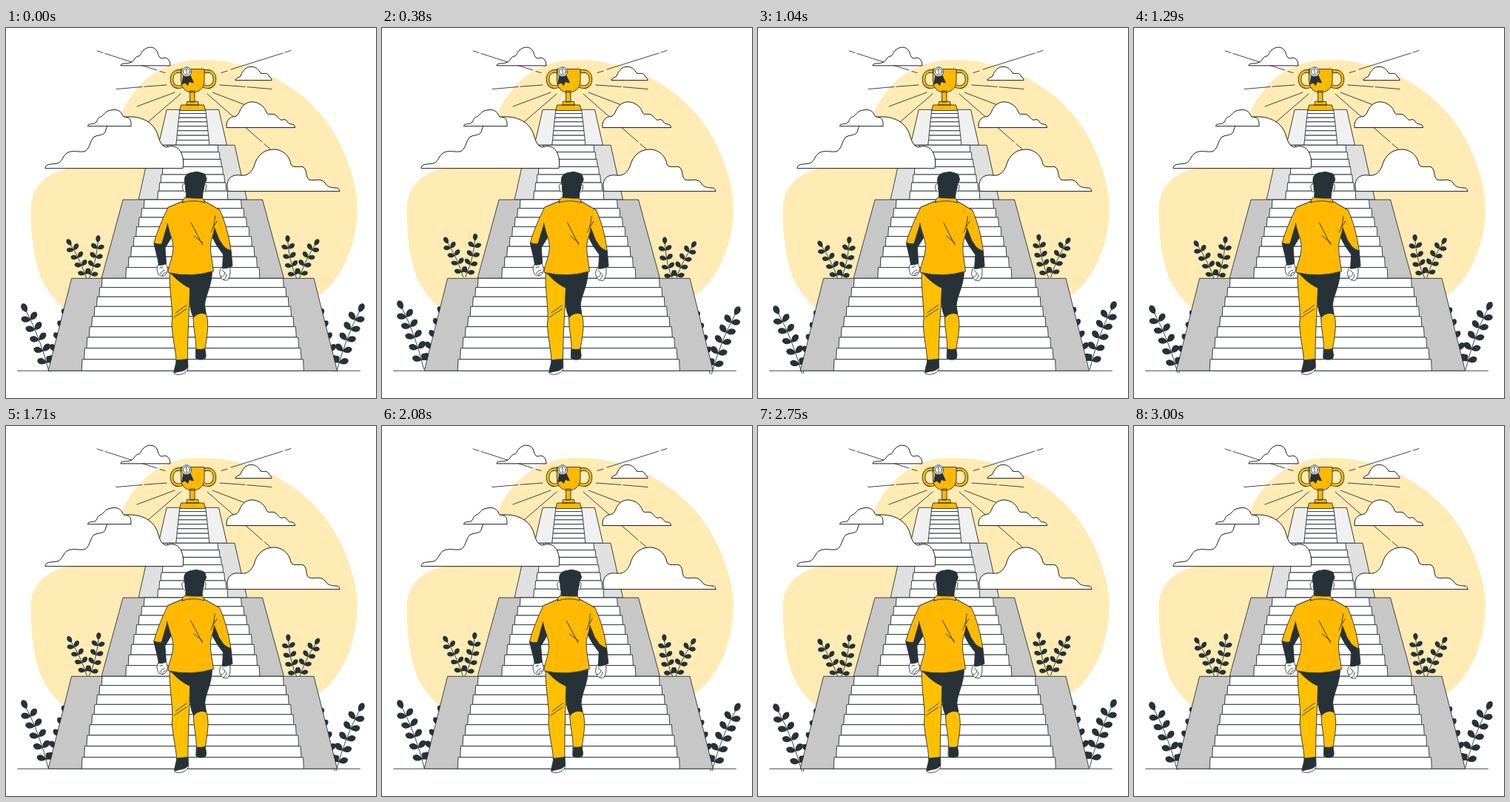
Recreate the animation shown at these times as an HTML page. Size 500x500 px, loop 3.04 s.

```html
<!DOCTYPE html>
<html lang="en">
<head>
<meta charset="utf-8">
<title>Climb to the trophy</title>
<style>
  html, body { margin: 0; width: 100%; height: 100%; overflow: hidden; background: #fff; }
  svg { display: block; width: 100%; height: 100%; }
  .line { fill: none; }
  .y { fill: #ffb900; }
  .leg { fill: #ffc000; }
  .w { fill: #fff; }
  .d { fill: #263238; }
</style>
</head>
<body>
<svg viewBox="0 0 500 500" stroke="#263238" stroke-width=".9" stroke-linejoin="round" stroke-linecap="round">
  <path fill="#ffebb3" stroke="none" d="M262 43C345 43 419 89 452 158C469 195 475 220 475 245C474 292 455 340 421 363L300 420L110 397C86 388 68 372 55 352C40 328 33.500 290 33.500 245C33.500 214 56 192 92 189C131 185 138 157 154 121C174 72 212 43 262 43Z"/>

  <path class="line" d="M123 31l8 2.500M134 34.500L204 57M208 58.500l7 2
    M385 30.500l-8 2.500M374 34L304 56M299 58l-8 2.500
    M149 82.500L184 79.500M187 79.200L217 77M359 82.500L326 79.700M323 79.400L289 77
    M177 106L228 87M189 129.500L236 89M326 105L279 87M272 89L346 154M349 156.500L357 163.500"/>

  <path class="line" d="M15.500 463.200H478.500"/>
  <g id="plants"></g>
  <g id="stairs"></g>

  <g id="trophy">
    <g class="line">
      <path stroke-width="4.600" d="M239 59.500C230 56 224 61 224 69.500C224 79 232 82 240 78M267 59.500C276 56 282 61 282 69.500C282 79 274 82 266 78"/>
      <path stroke="#ffb900" stroke-width="2.900" d="M239 59.500C230 56 224 61 224 69.500C224 79 232 82 240 78M267 59.500C276 56 282 61 282 69.500C282 79 274 82 266 78"/>
    </g>
    <path class="y" d="M249 85H255V100H249ZM245 99.300H259.500L260.500 104H244ZM237 104H267.500L269.500 111.500H235ZM236.500 55.500H268V72C268 81 261 87 252 87C243 87 236.500 81 236.500 72Z"/>
    <path class="d" d="M240 64L237.500 76L242 74L245.500 77.500L247.500 72.500L253.500 74L248.500 63Z"/>
    <circle class="w" cx="244" cy="59.300" r="6.500"/>
    <circle class="w" cx="244" cy="59.300" r="4.500"/>
    <text x="244" y="62" font-family="Lato, sans-serif" font-size="7.500" text-anchor="middle" stroke="none" fill="#263238">1</text>
  </g>

  <g class="w" stroke="#000">
    <path d="M155 50.500C157 46 162 49 167 47C174 46 173 39 179 38C183 37 182 33 185 31C190 24.500 201 24 204.500 32C206 38 208 41.500 211 41C218 38 222 44 222 50.500Z"/>
    <path d="M310 70.300C311 67 315 67 317 65C319 60 322 54 329 52.500C337 51 342 57 344 61C346 63 352 59 355 64C355 67 359 66 359 70.300Z"/>
    <path d="M298 134.200C297 124 303 120 311 119C316 117 315 108 324 102C336 96 349 104 352 114C354 119 360 114 365 118C370 123 370 125 374 124C381 122 379 130 386 130C389 130 390.500 132 390.500 134.200Z"/>
    <path d="M53 189.300C53 183 60 184.500 69 183C77 181 76 172 84 168C92 165 99 168 105 167C113 166 113 152 119 147C127 143.500 134 146 135 137C138 128 143 123 152 121.500C178 116 199 125 205 144C208 155 212 163 219 160.500C234 156 242 172 239 189.300Z"/>
    <path d="M110.500 132.300C111 128 118 131 121 128C124 126 123 121 128 120C132 119 133 112 142 111C151 109 156 113 157.500 118C159 121 160 119.500 164 121C169 122 169 127 169 132.300Z"/>
    <path d="M300 220.300C296 206 303 197 317 199C329 201 335 190 337 181C343 168 352 164 363 164C378 165 384 177 385 184C387 190 397 186 402 188C408 193 404 202 410 205C417 207 424 202 431 209C434 215 440 216 446 216C449 216 451 218 451 220.300Z"/>
  </g>

  <g id="man">
    <!-- legs and shoes -->
    <path class="w" d="M227 464C225 467 229 468.800 235 468.300C242 467 246 463 246 459L243 456Z"/>
    <path class="d" d="M230 449L245.500 447L246 458C242 465 235 463 228 466C226 462 230 456 230 449ZM257 434L269 432.500C269 438 271 442 269.500 446C266 449 259 448.500 256.500 446Z"/>
    <path class="leg" d="M221 332C221 360 226.500 385 224 400C225 420 229 433 230 449Q238 448 245.500 447.500C245.500 430 246 410 247 390L249 345Z"/>
    <path class="d" d="M222 330Q250 337 278.500 329C278 349 269 362 268.500 375L270.500 387L254 392C247 380 248.500 366 249 351.500C239 347 230 340 222 330Z"/>
    <path class="leg" d="M253 392C256 386 267 383 271 388C275 402 271 419 269 433.500Q263 435 257 434C257 420 253 405 253 392Z"/>
    <path class="line" d="M229.500 385L244 374.500M227 391L244 379.500"/>

    <!-- hands -->
    <path class="w" d="M206 319.500C203 324 204 329 206 333C209 336 213 336 216 333C219 329 219 323 215.500 318ZM291.500 323C288 328 288 333 290 336C291 340 296 342 299.500 340.500C303 336 304 328 302 322Z"/>
    <path class="line" d="M209 333C209 330 211 328 214.500 327.500M212 335C211.500 332 213 331 216 330.500M208 324L212 323M290.500 336C292 337 295 335 296 331M294 340C296 339 298 336 298 333M296 331L292 327"/>

    <!-- forearms -->
    <path class="d" d="M217.500 264L223 284L215 297L216.500 318.500Q212 321 206.500 320.500C205 310 202 301 200 291.500Z"/>
    <path class="d" d="M281 270L289 288L304 300L306 321.500Q300 325 292.500 325L293.500 306Q284 294 279 283Z"/>

    <!-- jacket -->
    <path class="y" d="M239 234L219 242.500C212 257 204 275 200 290.500Q205 293 210.500 292L219 263Z"/>
    <path class="y" d="M268 234L289 246C296 262 301 279 304 301Q298 299 294 295L288 286L281 268Z"/>
    <path class="y" stroke="none" d="M239 234L219 242.500L217.500 264L222 274L280 276L289 246L268 234Z"/>
    <path class="y" stroke="none" d="M219 264C221 279 228 290 225.500 302C224 314 219 322 219 330.500Q250 338 280.500 328.500C279 316 276 305 276.500 294C277 284 281 280 281.500 270Z"/>
    <path class="line" d="M239 234L219 242.500M268 234L289 246M218 264C221 279 228 290 225.500 302C224 314 219 322 219 330.500Q250 338 280.500 328.500C279 316 276 305 276.500 294C277 284 281 280 281.500 270"/>
    <path class="line" d="M250 263L265.500 293M254 281L266 290.500M282.500 254C282 262 280 271 277 276M285 261L281 268"/>

    <!-- head and collar -->
    <path class="w" d="M243 211C238 209.500 237.500 214 239 218C240 222 242 222 243.500 221ZM267 211C271 209 271 214 270 218C269 222 267 222 266 221Z"/>
    <path class="d" d="M242.500 213C241 207 240.500 203 243 199.500C247 195 252 195.500 255 194.700C259 193.700 263 195.500 266 196.300C269 197 270.500 199.500 270 201.500C272 203.500 271 207 268.500 209.500C268 214 267.500 219 266 222L265.500 231H243L243.500 222C242 219 242.500 216 242.500 213Z"/>
    <path class="y" d="M238.500 236C239 232 240 229.500 243 229C250 230 259 230 265 230C267 231 268 233 268.500 236C258 233 248 233 238.500 236Z"/>
  </g>
</svg>
<script>
const $ = id => document.getElementById(id);
const LOOP = 3040, AXIS = 252.5;
const mix = (a, b, u) => a + (b - a) * u;

// One flight: half widths of the slabs and of the steps, at top and bottom
function flight(y0, y1, outer, inner, count, fill) {
  const shape = (ya, yb, a, b, color) =>
    `<path fill="${color}" d="M${AXIS - a} ${ya}H${AXIS + a}L${AXIS + b} ${yb}H${AXIS - b}Z"/>`;
  const level = i => mix(y0, y1, i / count * (0.87 + 0.13 * i / count));
  let out = shape(y0, y1, ...outer, fill);
  for (let i = 0; i < count; i++) {
    const half = mix(...inner, i / (count - 1));
    out += shape(level(i), level(i + 1), half - 0.4, half + 0.4, '#fff');
  }
  return out;
}

$('stairs').innerHTML =
  flight(110.3, 158.3, [35, 46], [17.5, 22], 8, '#f0f0f0') +
  flight(158.3, 232, [56.5, 73], [34, 47], 7, '#e0e0e0') +
  flight(232, 338.3, [94, 123], [65.5, 90], 8, '#c7c7c7') +
  flight(338.3, 463.2, [163.5, 195], [122.5, 149.5], 9, '#c7c7c7');

// A sprig follows a quadratic curve, with paired leaves and one at the tip
function sprig([x0, y0, cx, cy, x1, y1], pairs, len) {
  const w = len * 0.42;
  const leaf = (x, y, turn) =>
    `<path class="d" stroke="none" transform="translate(${x} ${y}) rotate(${turn})"
      d="M0 0C${len * 0.3} ${-w} ${len * 0.9} ${-w} ${len} 0C${len * 0.9} ${w} ${len * 0.3} ${w} 0 0Z"/>`;
  const bend = (a, c, b, t) => mix(mix(a, c, t), mix(c, b, t), t);
  const heading = t =>
    Math.atan2(mix(cy - y0, y1 - cy, t), mix(cx - x0, x1 - cx, t)) * 180 / Math.PI;
  let out = `<path class="line" d="M${x0} ${y0}Q${cx} ${cy} ${x1} ${y1}"/>`;
  for (let i = 0; i < pairs; i++) {
    const t = mix(0.13, 0.85, i / (pairs - 1));
    const x = bend(x0, cx, x1, t), y = bend(y0, cy, y1, t);
    out += leaf(x, y, heading(t) - 58) + leaf(x, y, heading(t) + 62);
  }
  return out + leaf(x1, y1, heading(1));
}

const side =
  sprig([58, 464, 46, 418, 28, 384], 5, 13) +
  sprig([60, 464, 72, 420, 88, 376], 5, 12) +
  sprig([109, 339, 101, 314, 88, 294], 4, 10) +
  sprig([112, 339, 122, 317, 124, 290], 4, 10);
$('plants').innerHTML = side + `<g transform="translate(${2 * AXIS}) scale(-1 1)">${side}</g>`;

// Linear sway in degrees: 0, 1, -1, 0
const sway = p => (p %= 1) < 0.25 ? 4 * p : p < 0.75 ? 2 - 4 * p : 4 * p - 4;
const turn = (id, angle, y) => $(id).setAttribute('transform', `rotate(${angle} ${AXIS} ${y})`);

const start = performance.now();
function draw() {
  const p = (performance.now() - start) / LOOP;
  turn('man', sway(p), 331);
  turn('plants', sway(2 * p), 372);
  requestAnimationFrame(draw);
}
draw();
</script>
</body>
</html>
```
